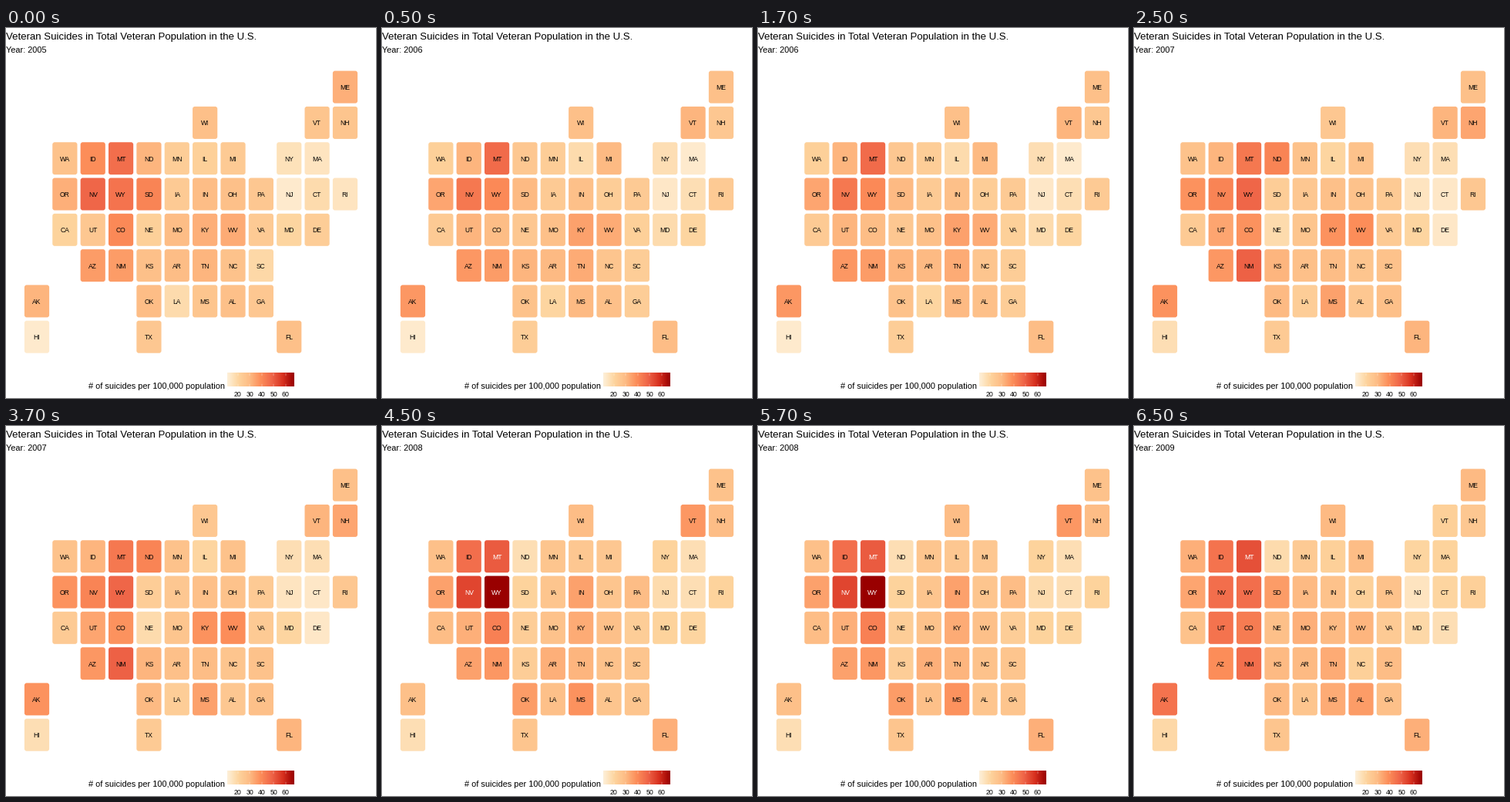
These frames come from a looping animation (480x480 px, 8000 ms). A matplotlib script:

```python
import matplotlib.pyplot as plt
import numpy as np
from matplotlib.animation import FuncAnimation
from matplotlib.colors import LinearSegmentedColormap, Normalize
from matplotlib.patches import FancyBboxPatch

SIZE, DPI = 480, 80
GRID = """
.. .. .. .. .. .. .. .. .. .. .. ME
.. .. .. .. .. .. WI .. .. .. VT NH
.. WA ID MT ND MN IL MI .. NY MA ..
.. OR NV WY SD IA IN OH PA NJ CT RI
.. CA UT CO NE MO KY WV VA MD DE ..
.. .. AZ NM KS AR TN NC SC .. .. ..
AK .. .. .. OK LA MS AL GA .. .. ..
HI .. .. .. TX .. .. .. .. FL .. ..
"""

# Rate per 100,000 -> states, for each year
RATES = {
    2005: {13: "HI NJ", 15: "MA RI", 16: "NY", 18: "LA CT", 19: "SC",
           20: "MD", 21: "CA", 22: "IL NE", 23: "MN DE", 24: "MI IA VA",
           25: "PA UT GA TX", 26: "VT NH MS", 27: "WA NC",
           28: "WI OH KS AL FL", 29: "IN MO AR OK", 31: "ND TN AK",
           32: "ME OR KY", 33: "WV", 36: "AZ NM", 39: "ID", 40: "CO",
           41: "SD", 45: "WY", 46: "MT", 48: "NV"},
    2006: {13: "HI MA", 14: "NJ", 17: "NY CT", 18: "IL MD", 20: "DE LA",
           22: "WA VA", 23: "MN OH SC GA TX", 24: "IA PA RI CA",
           25: "NH ND NE", 26: "NC", 27: "OK", 28: "ME WI IN MO AL",
           29: "CO FL", 30: "MI SD AR MS", 31: "VT ID UT KS", 33: "WV TN",
           34: "OR", 35: "KY", 36: "NM", 37: "AZ AK", 40: "WY", 44: "NV",
           47: "MT"},
    2007: {14: "CT DE", 15: "NJ", 17: "NY MA HI", 18: "NE", 20: "IL MD",
           23: "SD LA", 24: "PA CA VA TX", 25: "WI IA RI AL", 26: "MO NC",
           27: "WA MN MI OH SC", 28: "ME IN AR GA", 29: "TN", 30: "OK",
           31: "VT ID KS FL", 34: "NH UT", 35: "MS", 37: "AZ",
           38: "OR CO KY AK", 39: "WV", 41: "ND NV", 44: "MT", 48: "WY",
           49: "NM"},
    2008: {17: "ND MA CT HI", 18: "NJ", 20: "DE", 21: "NY SD RI MD",
           23: "NE VA KS", 25: "IL MI", 26: "MN IA OH SC AL GA TX",
           27: "ME MO NC", 28: "WA WV AK LA", 29: "WI NH PA CA", 31: "TN",
           32: "UT AR FL", 33: "KY", 35: "OR IN AZ", 36: "OK", 37: "VT NM",
           38: "MS", 42: "CO", 46: "ID", 50: "MT", 54: "NV", 67: "WY"},
    2009: {15: "NJ", 17: "DE", 18: "ND", 19: "MD HI", 20: "NY CT", 21: "MA",
           22: "VT IL OH RI NC", 24: "MN VA", 25: "NH", 26: "LA TX",
           27: "IN PA CA", 28: "NE GA", 29: "MI SC",
           30: "ME WI IA KY KS AR OK", 31: "WV", 32: "WA MO FL",
           33: "TN MS", 34: "OR", 36: "SD AL", 39: "AZ", 43: "CO",
           45: "ID UT AK", 46: "NV WY NM", 52: "MT"},
}
WHITE_LABEL_FROM = 50

palette = LinearSegmentedColormap.from_list("heat", [
    "#FEF0D9", "#FDD49E", "#FDBB84", "#FC8D59", "#EF6548", "#D7301F",
    "#990000"])
scale = Normalize(11, 67)

plt.rcParams["font.family"] = "Liberation Sans"
fig = plt.figure(figsize=(SIZE / DPI, SIZE / DPI), dpi=DPI, facecolor="white")
ax = fig.add_axes([0, 0, 1, 1])
ax.axis("off")


def text(x, baseline, string, px, align="left"):
    return ax.text(x, baseline, string, fontsize=px * 72 / DPI, color="black",
                   ha=align, va="baseline")


def add_tile(cx, cy, state, w=32.2, h=42):
    box = FancyBboxPatch((cx - w / 2, cy - h / 2), w, h, linewidth=0,
                         boxstyle="round,pad=0,rounding_size=3")
    ax.add_patch(box)
    return box, text(cx, cy + 3.4, state, 8.54, "center")


def add_legend(left=287, top=448, width=86.4, height=17.3):
    text(107, 468, "# of suicides per 100,000 population", 11)
    ax.imshow(np.linspace(0, 1, 300)[None], cmap=palette, aspect="auto",
              extent=(left, left + width, top + height, top))
    for value in range(20, 70, 10):
        x = left + width * scale(value)
        for y, end in ((top, top + height / 5),
                       (top + height, top + height * 4 / 5)):
            ax.plot([x, x], [y, end], color="white", lw=0.3)
        text(x, 478, str(value), 8.8, "center")


text(0, 15, "Veteran Suicides in Total Veteran Population in the U.S.", 13.2)
subtitle = text(0, 32, "", 11)
add_legend()
tiles = {state: add_tile(40 + 36.36 * col, 76.6 + 46.3 * row, state)
         for row, line in enumerate(GRID.split("\n")[1:-1])
         for col, state in enumerate(line.split()) if state != ".."}
ax.set(xlim=(0, SIZE), ylim=(SIZE, 0))


def update(frame):
    year = 2005 + (frame + 3) // 4
    subtitle.set_text(f"Year: {year}")
    for rate, states in RATES[year].items():
        for state in states.split():
            box, label = tiles[state]
            box.set_facecolor(palette(scale(rate)))
            label.set_color("white" if rate >= WHITE_LABEL_FROM else "black")


anim = FuncAnimation(fig, update, frames=16, interval=500, repeat=True)
plt.show()
```
